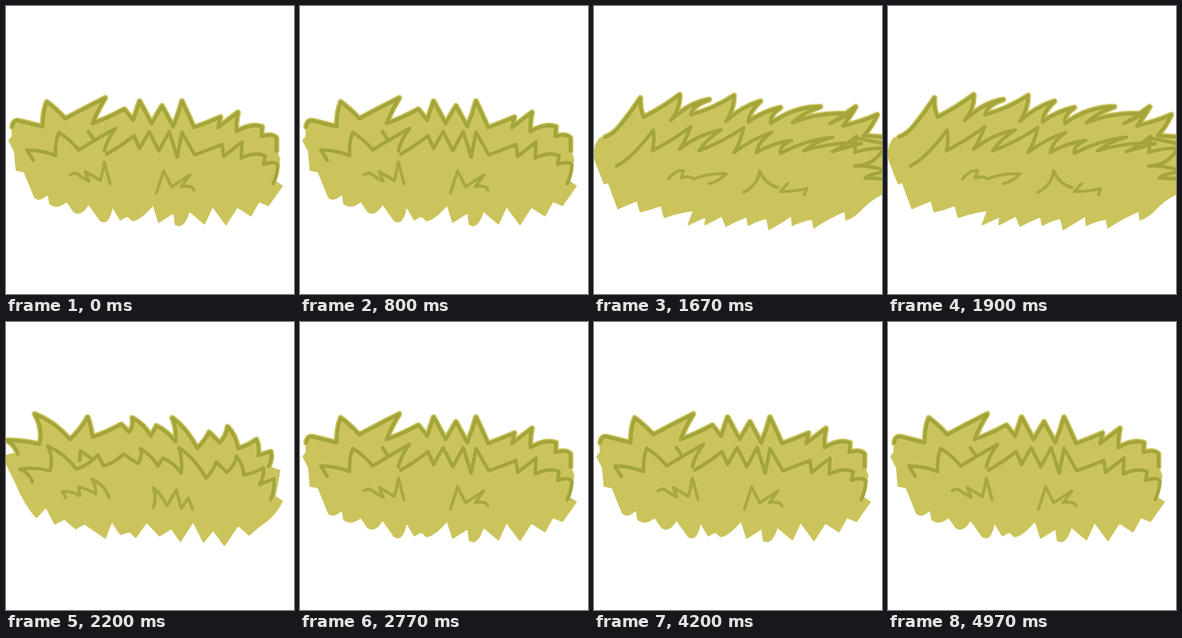
An HTML page that plays this animation: 360 by 360 pixels, repeating every 5070 ms.

```html
<!DOCTYPE html>
<html lang="en">
<head>
<meta charset="utf-8">
<title>Grass in the wind</title>
<style>
  html, body { margin: 0; width: 100%; height: 100%; overflow: hidden; background: #fff; }
  svg { display: block; width: 100vw; height: 100vh; }
  path { fill: none; stroke-linecap: round; stroke-linejoin: round; }
  .body { fill: #cbc45c; stroke: #cbc45c; stroke-width: 2; }
  .rim { stroke: #cbc45c; stroke-width: 7.5; }
  .blade { stroke: #a3a53b; stroke-width: 4.4; }
  .mark { stroke: #a7a840; stroke-width: 3.8; }
</style>
</head>
<body>
<svg id="stage" viewBox="0 0 360 360"></svg>
<script>
const LOOP = 5070;

// Each pose: back ridge, lower edge from right to left, front ridge, small tufts.
const poses = {
  rest: {
    ridge: 'M8 151 Q9 141 18 144 L46 151 Q46 132 51 120 Q62 128 74 141 Q98 128 124 115 ' +
      'Q114 131 108 147 Q128 140 148 129 L159 143 L167 119 L182 147 L195 125 L209 151 ' +
      'Q216 135 220 119 Q228 136 235 152 Q252 146 268 139 L265 152 Q278 142 290 133 ' +
      'Q287 145 288 157 Q307 146 320 151 L319 163 Q333 159 338 165 L338 181',
    edge: 'L342 192 L336 219 L345 225 L328 249 L316 244 L306 262 L289 251 L275 273 ' +
      'L258 250 L248 272 L229 256 Q222 279 212 273 L210 258 L191 270 L184 248 Q168 267 158 268 ' +
      'L152 262 L143 267 L133 250 Q128 275 118 268 L103 247 Q94 263 85 257 L76 244 ' +
      'Q64 254 55 247 L53 234 Q42 245 36 239 L23 207 L13 205 L11 182 L4 168 L8 163 Z',
    front: 'M34 193 L26 180 Q45 180 62 187 Q61 170 66 158 Q79 166 91 180 Q115 165 137 153 ' +
      'Q126 167 123 181 M103 157 L109 166 M126 185 Q144 175 160 162 L167 178 L179 157 ' +
      'L191 181 L204 157 L214 189 L220 158 L236 186 Q253 180 270 173 L272 188 L295 170 ' +
      'L294 190 Q311 182 324 187 L322 198 Q336 193 340 199 Q339 212 334 222',
    marks: 'M80 211 Q87 206 93 213 L104 219 L99 207 L118 218 Q121 207 123 195 L130 222 ' +
      'M188 234 L197 206 L207 226 L230 211 L219 226 Q232 223 235 230'
  },
  lean: {
    ridge: 'M20 164 Q24 141 40 129 Q36 139 39 147 Q61 126 88 122 Q77 132 76 140 ' +
      'Q101 125 130 127 Q119 133 122 141 Q142 136 157 126 Q151 137 154 144 ' +
      'Q171 130 194 128 L187 143 Q204 132 223 130 Q213 137 216 145 Q240 129 265 125 ' +
      'Q256 137 257 147 Q278 134 299 130 Q289 143 292 151 Q312 138 332 136 ' +
      'Q315 145 304 153 Q319 150 333 152 Q325 158 327 166 Q340 163 351 167 L338 185',
    edge: 'L341 190 L362 191 L362 225 Q343 247 312 263 L315 252 Q296 256 276 271 L277 261 ' +
      'Q258 263 245 274 L246 249 Q231 258 225 278 L213 277 L211 258 L191 270 L190 253 ' +
      'Q171 261 154 271 L153 266 L145 271 L139 260 Q127 264 119 268 L115 252 Q104 256 94 262 ' +
      'L84 246 Q75 250 61 251 L56 235 Q44 240 33 246 L24 230 L22 212 Q10 214 7 207 ' +
      'Q3 181 7 163 Q11 159 16 164 Z',
    front: 'M37 201 Q40 182 55 174 Q50 181 53 188 Q75 170 101 166 Q92 174 96 178 ' +
      'Q119 169 146 163 Q151 168 138 176 M127 174 Q151 170 170 164 Q163 174 166 183 ' +
      'Q186 169 209 166 Q200 176 202 182 Q217 172 233 169 L227 184 Q250 173 276 170 ' +
      'Q260 178 253 189 Q281 174 307 172 L277 188 Q304 173 328 171 L302 189 ' +
      'Q329 180 350 186 Q335 193 332 201 Q346 199 353 204 Q344 217 328 228',
    marks: 'M90 219 Q96 206 104 201 L103 217 Q117 207 132 203 L123 215 Q143 207 158 198 ' +
      'Q146 215 132 222 M190 233 Q208 219 228 206 L206 223 Q230 215 251 218 L226 231 Q241 230 250 235'
  },
  gust: {
    ridge: 'M14 164 Q25 160 34 148 Q47 132 58 115 Q57 129 62 139 Q86 127 107 111 ' +
      'Q108 127 96 143 Q119 121 144 117 Q123 124 121 136 Q151 128 175 112 ' +
      'Q175 128 165 144 Q185 126 208 119 Q193 133 193 145 Q211 132 233 127 ' +
      'Q219 136 221 147 Q250 126 283 126 Q260 134 248 146 Q282 132 320 135 L295 147 ' +
      'Q311 138 327 126 Q321 137 311 150 Q334 145 354 136 Q347 151 337 162 L362 164',
    edge: 'L362 234 Q347 240 330 258 Q321 266 315 267 L314 256 Q294 264 275 277 L273 266 ' +
      'Q258 269 248 274 L247 262 Q230 273 219 279 L216 265 Q203 268 193 274 L191 263 ' +
      'Q176 269 165 275 L160 262 L139 273 L140 263 L118 273 L125 255 Q105 258 88 264 ' +
      'L84 249 Q70 254 58 257 L54 243 Q41 248 30 253 L18 220 L13 222 L2 194 Q-2 176 8 165 Z',
    front: 'M28 200 Q48 190 74 155 Q76 168 73 181 Q98 168 121 151 Q115 167 107 179 ' +
      'Q131 160 159 155 Q140 167 131 181 Q161 170 187 152 Q184 169 175 183 ' +
      'Q198 166 222 158 Q205 170 203 183 Q224 171 247 168 Q231 175 233 184 ' +
      'Q266 167 298 164 Q274 171 262 181 Q301 169 334 172 L298 182 Q315 174 328 163 ' +
      'L326 183 Q344 177 362 178 M328 165 L362 172 M362 179 Q348 200 326 200 Q345 199 362 205 ' +
      'M362 208 Q347 209 339 215 L362 216',
    marks: 'M93 216 Q103 204 112 206 L109 215 Q119 212 125 216 Q146 208 165 210 Q155 220 144 222 ' +
      'M187 233 Q205 224 207 206 Q213 222 230 227 M242 222 L233 232 Q252 232 266 228 L263 236'
  },
  rebound: {
    ridge: 'M15 165 Q11 153 1 148 Q22 148 42 153 Q47 134 36 115 Q61 125 80 147 ' +
      'Q94 134 102 119 Q106 130 108 144 Q126 138 144 128 L154 138 Q160 130 158 120 ' +
      'Q172 127 181 143 L188 130 Q201 136 212 150 Q214 135 208 120 Q225 132 239 158 ' +
      'Q248 150 254 138 L267 151 Q275 144 277 131 Q287 141 290 158 Q302 155 313 147 ' +
      'Q317 156 315 167 L331 162 Q333 171 328 181',
    edge: 'L342 186 L336 218 L345 224 Q338 239 324 250 Q315 256 304 266 L290 254 L273 279 ' +
      'L259 260 L247 275 L234 249 L218 274 L207 258 L192 267 L176 250 L162 269 L155 262 ' +
      'L143 265 L132 249 L124 270 L98 252 L87 258 L73 246 L61 252 L50 231 L38 244 ' +
      'Q24 229 12 200 L-1 174 L0 167 L12 164 Z',
    front: 'M33 200 Q29 188 17 184 Q37 181 55 186 Q60 169 52 155 Q74 165 88 184 ' +
      'Q105 178 115 166 L122 180 Q136 176 147 165 L165 177 Q171 168 168 158 ' +
      'Q182 167 190 180 L196 170 Q210 176 219 189 Q221 173 216 157 Q235 169 250 195 ' +
      'Q259 186 263 175 L276 188 Q286 180 288 168 Q297 179 297 191 Q311 189 322 182 ' +
      'Q323 193 317 203 L335 196 Q336 210 331 222 M92 173 L93 161 L106 170',
    marks: 'M75 220 L70 212 Q82 211 92 217 L91 206 Q103 209 112 215 Q113 205 107 196 ' +
      'Q124 204 129 220 M184 232 Q189 219 184 207 Q195 216 201 230 L213 210 L219 233 L228 220 L233 234'
  }
};

const steps = [
  [0, 'rest'], [1230, 'lean'], [1430, 'gust'],
  [2000, 'lean'], [2200, 'rebound'], [2430, 'rest']
];

const stage = document.getElementById('stage');
const svgNode = name => document.createElementNS('http://www.w3.org/2000/svg', name);

function addPath(group, kind, d) {
  const path = svgNode('path');
  path.setAttribute('class', kind);
  path.setAttribute('d', d);
  group.append(path);
}

const groups = {};
for (const [name, pose] of Object.entries(poses)) {
  const group = groups[name] = svgNode('g');
  addPath(group, 'body', pose.ridge + pose.edge);
  addPath(group, 'rim', pose.ridge);
  addPath(group, 'blade', pose.ridge);
  addPath(group, 'blade', pose.front);
  addPath(group, 'mark', pose.marks);
  stage.append(group);
}

const start = performance.now();

function draw() {
  const time = (performance.now() - start) % LOOP;
  const current = steps.filter(([from]) => from <= time).pop()[1];
  for (const name in groups) groups[name].style.display = name === current ? '' : 'none';
  requestAnimationFrame(draw);
}
draw();
</script>
</body>
</html>
```
